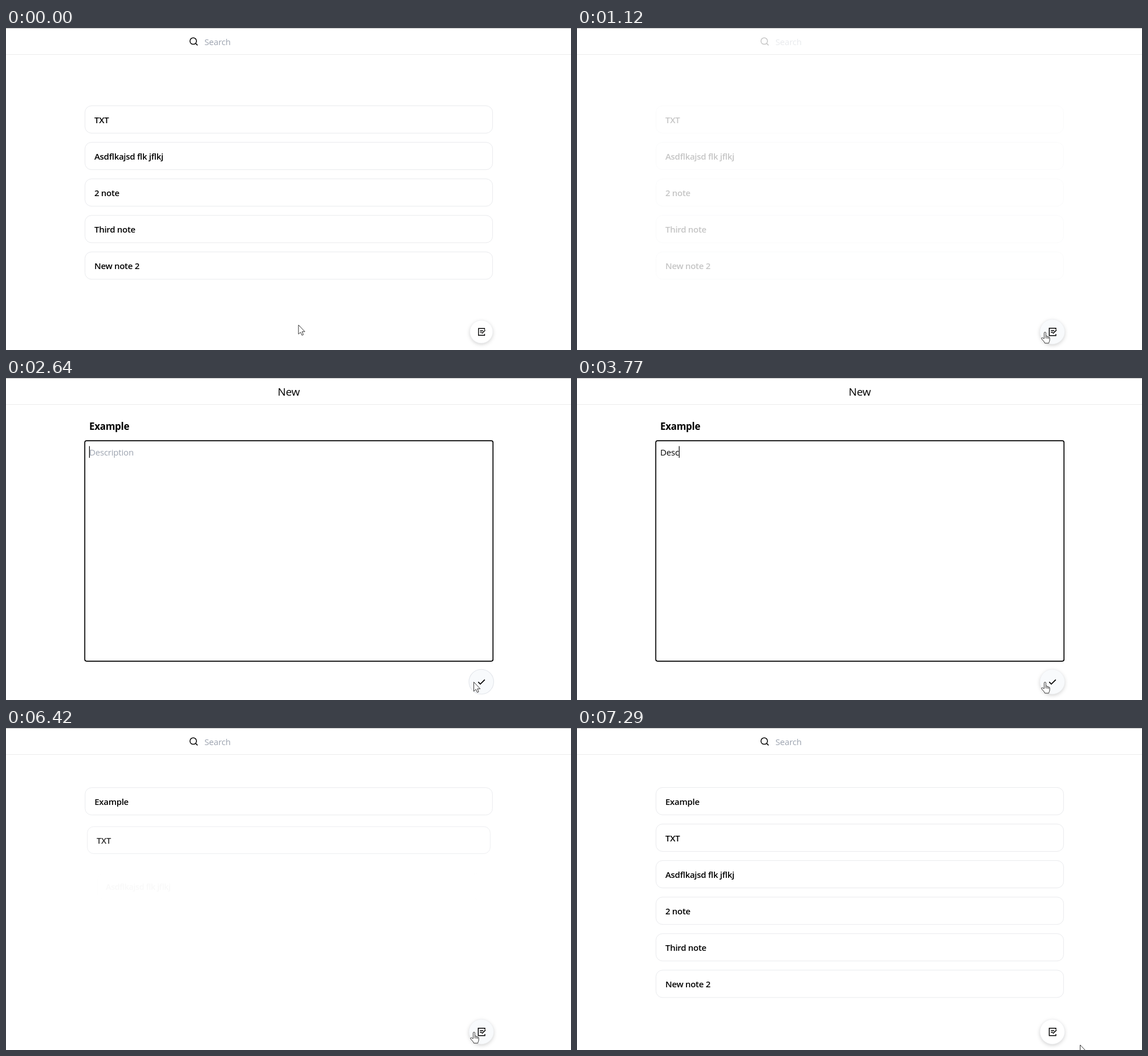
Animation of 991 by 565 pixels, one loop 7.35 s. Source, as an HTML page:

```html
<!DOCTYPE html>
<html lang="en">
<head>
<meta charset="utf-8">
<title>Notes</title>
<style>
  html, body { margin: 0; width: 100%; height: 100%; overflow: hidden; background: #fff; }
  svg { display: block; width: 991px; height: 565px; }
  text { font: 400 15px "Open Sans", "Noto Sans", sans-serif; letter-spacing: -.2px; }
  .card text { font-weight: 600; letter-spacing: -.3px; }
  .card rect { fill: #fff; stroke: #e9eaed; }
  #heading { font-size: 19px; font-weight: 500; text-anchor: middle; }
  #title { font-size: 17px; font-weight: 700; letter-spacing: -.3px; }
  .hint { fill: #9ca3af; }
  .ring { fill: none; stroke: #000; stroke-width: 1.7; }
  .icon { fill: none; stroke: #000; }
  #face { filter: drop-shadow(0 2px 3px rgba(0, 0, 0, .17)); }
  .pointer { fill: #fff; stroke: #333; stroke-linejoin: round; }
</style>
</head>
<body>
<svg viewBox="0 0 991 565">
  <path d="M0 .5H991" stroke="#bdbdbd"/>
  <path d="M0 46.5H991" stroke="#ebebeb"/>

  <g id="search">
    <g class="icon" stroke-width="1.5">
      <circle cx="328.4" cy="22.9" r="5.7"/>
      <path d="M332.4 26.9L336 30.4"/>
    </g>
    <text class="hint" x="348" y="30">Search</text>
  </g>

  <g id="list"></g>

  <g id="editor">
    <text id="heading" x="496" y="31">New</text>
    <rect id="titleRing" class="ring" x="138.2" y="62.2" width="716" height="44" rx="5"/>
    <rect id="bodyRing" class="ring" x="138.2" y="110.2" width="716" height="386.6" rx="3"/>
    <text id="title" x="146" y="91"></text>
    <text id="body" x="146" y="136"></text>
    <rect id="caret" width="1.2"/>
  </g>

  <g id="fab">
    <circle id="face" r="20"/>
    <g id="pencil" class="icon" stroke-width="2.1" transform="translate(-7.6 -7.8) scale(.667)">
      <path d="M20 6.3V3H4V21H20V17.2M8 9H16M8 13H13M12.8 16.2L21.6 7.4"/>
    </g>
    <path id="check" class="icon" stroke-width="1.6" d="M-5 .4L-1.6 3.8L5.6 -3.4"/>
  </g>

  <circle id="press" cx="819.5" cy="534" r="11.2" fill="#f5f000" fill-opacity=".58"/>
  <path id="arrow" class="pointer" d="M0 0V16.2L3.7 12.8L6.1 18.2L8.6 17.1L6.3 11.8H11.2Z"/>
  <path id="hand" class="pointer" transform="translate(814 533)"
    d="M5.4 12V2.2a1.5 1.5 0 0 1 3 0V8.2a1.3 1.3 0 0 1 2.5 .2V9a1.2 1.2 0 0 1 2.3 .3V10a1 1 0 0 1 1.9 .4V14c0 3-1.4 3.6-1.5 6H6.6C6 17 2 14.6 .8 12c-.5-1.6 1.2-2.2 2.3-1ZM8.4 8.2V11.6M10.9 9V12M13.2 10V12.4"/>
</svg>

<script>
  const LOOP = 7350, TICK = 66.2;
  const NOTES = ['Example', 'TXT', 'Asdflkajsd flk jflkj', '2 note', 'Third note', 'New note 2'];

  // [time, characters typed]
  const TITLE_KEYS = [[1650, 1], [1910, 2], [1980, 3], [2180, 4], [2310, 5], [2440, 7]];
  const BODY_KEYS = [[3300, 1], [3370, 2], [3570, 3], [3770, 4], [3970, 5], [4170, 6],
                     [4370, 7], [4970, 8], [5030, 10], [5090, 11]];

  const $ = id => document.getElementById(id);
  const set = (el, attrs) => { for (const k in attrs) el.setAttribute(k, attrs[k]); };
  const show = (id, on) => set($(id), { opacity: +on });
  const within = (t, a, b) => t >= a && t < b;
  const ramp = (t, a, b) => Math.min(1, Math.max(0, (t - a) / (b - a)));
  const easeOut = p => 1 - (1 - p) ** 4;
  const easeInOut = p => p * p * (3 - 2 * p);
  const typed = (keys, t) => keys.reduce((n, [at, count]) => t >= at ? count : n, 0);

  const cards = NOTES.map(note => {
    const card = document.createElementNS('http://www.w3.org/2000/svg', 'g');
    card.setAttribute('class', 'card');
    card.innerHTML = `<rect x="-357.5" y="-24" width="715" height="48" rx="11.5"/>
      <text x="-341" y="6.2">${note}</text>`;
    $('list').append(card);
    return card;
  });

  function drawCards(t, q) {
    const returning = t >= 6020;
    const leaving = ramp(q, 970, 1170);
    cards.forEach((card, i) => {
      const start = 6220 + 100 * i;
      const e = returning ? easeOut(ramp(q, start, start + 300)) : 1;
      const top = returning ? 104.4 + 64.1 * i : 136.5 + 64.1 * (i - 1);
      const alpha = returning ? e : i ? 1 - leaving : 0;
      const scale = 1 - .06 * (1 - e);
      set(card, {
        opacity: alpha,
        transform: `translate(496 ${top + 24 + 22 * (1 - e)}) scale(${scale})`
      });
    });
  }

  function drawField(el, text, hint) {
    el.textContent = text || hint;
    el.setAttribute('class', text ? '' : 'hint');
    return 145.8 + (text ? el.getComputedTextLength() : 0);
  }

  function drawEditor(t, q) {
    set($('editor'), { opacity: ramp(q, 1170, 1370) * (1 - ramp(q, 6000, 6200)) });
    const inBody = t >= 2640, focused = t < 5620;
    const titleEnd = drawField($('title'), 'Example'.slice(0, typed(TITLE_KEYS, t)), 'Title');
    const bodyEnd = drawField($('body'), 'Description'.slice(0, typed(BODY_KEYS, t)), 'Description');
    show('titleRing', !inBody);
    show('bodyRing', inBody && focused);
    set($('caret'), inBody ? { x: bodyEnd, y: 119.5, height: 20.5 } : { x: titleEnd, y: 72, height: 23 });
    show('caret', focused && !within(t, 3170, 3300) && !within(t, 4900, 4970));
  }

  function drawButton(t, q) {
    const editing = within(t, 1180, 6150);
    const flat = within(t, 1250, 3170);
    const hover = ramp(q, 710, 850);
    const over = within(t, 730, 7220);
    set($('fab'), { transform: `translate(833.7 533) scale(${1 + .085 * hover})` });
    set($('face'), {
      fill: over ? '#f8fafc' : '#fff',
      stroke: flat ? '#e2e5ea' : '#eceef1',
      'stroke-width': flat ? 1 : .6
    });
    $('face').style.filter = flat ? 'none' : '';
    show('pencil', !editing);
    show('check', editing);
  }

  function drawPointer(t, q) {
    const hand = within(t, 780, 1250) || within(t, 3170, 7220);
    let x = 820.5, y = 533.5;
    if (t < 1250) {
      const p = easeInOut(ramp(q, 0, 790));
      x = 513 + 307.5 * p;
      y = 521 + 12.5 * p;
    } else if (t >= 7220) {
      [x, y] = t < 7290 ? [846, 545] : [882.5, 556];
    }
    set($('arrow'), { transform: `translate(${x} ${y})` });
    show('arrow', !hand);
    show('hand', hand);
    show('press', within(t, 850, 980) || within(t, 5620, 6020));
  }

  function draw(t) {
    const q = Math.floor((t + 12) / TICK) * TICK;
    const searchAlpha = t < 3000 ? 1 - ramp(q, 970, 1170) : ramp(q, 6150, 6350);
    set($('search'), { opacity: searchAlpha });
    drawCards(t, q);
    drawEditor(t, q);
    drawButton(t, q);
    drawPointer(t, q);
  }

  const begin = performance.now();
  function frame() {
    draw((performance.now() - begin) % LOOP);
    requestAnimationFrame(frame);
  }
  frame();
</script>
</body>
</html>
```
